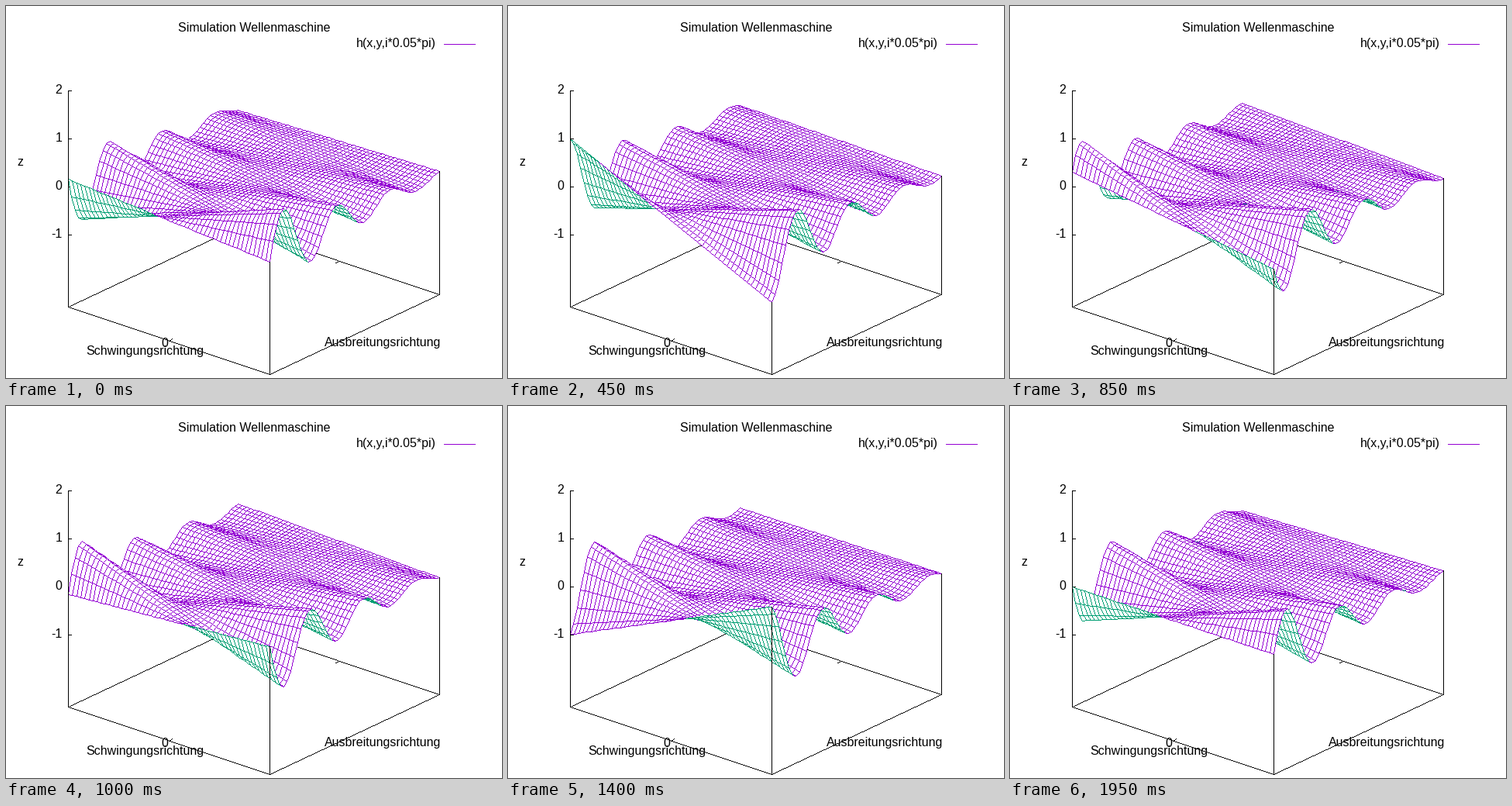
A matplotlib script for the animation above (2000 ms loop, 640 px wide and 480 px high).

```python
import numpy as np
import matplotlib.pyplot as plt
from matplotlib.animation import FuncAnimation

W, H, DPI = 640, 480, 100
FRAMES, INTERVAL = 40, 50
WAVE, DAMP, BASE = 20, 2.5, -2.5
WHITE, BLACK, TOP, UNDER = range(4)
PALETTE = np.array([[255, 255, 255], [0, 0, 0], [148, 0, 211], [0, 158, 115]],
                   dtype=np.uint8)


def project(u, s, z):
    """Map u, s in 0..1 and the height z to stage pixels."""
    return np.array([80 + 260 * u + 219 * s, 233 + 87 * u - 103 * s - 62 * z])


def height(u, s, t):
    return (1 - 2 * u) * np.exp(-DAMP * s) * np.sin(t - WAVE * s)


def snap(v):
    return np.floor(v + 0.5).astype(int)


def trace(p, q, n):
    """Pixels of one-pixel lines from p to q, at most n steps long."""
    d = q - p
    steps = np.maximum(np.abs(d).max(axis=0), 1)[..., None]
    k = np.minimum(np.arange(n + 1), steps) / steps
    return snap(p[..., None] + d[..., None] * k)


def line(canvas, p, q, color=BLACK):
    x, y = trace(snap(np.array(p)), snap(np.array(q)), W)
    canvas[y, x] = color


def cells(a):
    """Corners of every grid cell, ordered from back to front."""
    quads = np.stack([a[:-1, :-1], a[:-1, 1:], a[1:, 1:], a[1:, :-1]], axis=-1)
    return quads[::-1].reshape(-1, 4)


def label(x, y, text, ha="center"):
    ax.text(x - 0.5, y - 0.5, text, ha=ha, va="baseline",
            family="Liberation Sans", fontsize=16 * 72 / DPI, color="black")


# Base, z axis, ticks and key
backdrop = np.full((H, W), WHITE, dtype=np.uint8)
corners = [(0, 0), (1, 0), (1, 1), (0, 1)]
for a, b in zip(corners, corners[1:] + corners[:1]):
    line(backdrop, project(*a, BASE), project(*b, BASE))
for s0, s1 in ((0, 0.02), (1, 0.98)):
    line(backdrop, project(0.5, s0, BASE), project(0.5, s1, BASE))
for z in range(-1, 3):
    line(backdrop, (80, 233 - 62 * z), (84, 233 - 62 * z))
line(backdrop, (565, 49), (605, 49), TOP)

# Sample weights that fill a cell, and the ends of its four sides
a, b = np.meshgrid((np.arange(8) + 0.5) / 8, (np.arange(28) + 0.5) / 28)
FILL = np.stack([(1 - a) * (1 - b), a * (1 - b), a * b, (1 - a) * b])
FILL = FILL.reshape(4, -1)
START, END = [0, 1, 3, 0], [1, 2, 2, 3]
grid = np.linspace(0, 1, 50)
U, S = np.meshgrid(grid, grid)


def render(i):
    t = (i + 1) * 0.05 * np.pi
    canvas = backdrop.copy()
    exact = np.array([cells(v) for v in project(U, S, height(U, S, t))])
    dx, dy = exact[..., 2] - exact[..., 0]
    ex, ey = exact[..., 3] - exact[..., 1]
    color = np.where(dx * ey - ex * dy < 0, TOP, UNDER)

    # Later cells overwrite earlier ones, which hides what lies behind
    quad = snap(exact)
    inside = snap(quad @ FILL)
    sides = trace(quad[..., START], quad[..., END], 30)
    sides = sides.reshape(2, len(color), -1)
    ink = np.hstack([np.full(inside.shape[1:], WHITE),
                     np.repeat(color[:, None], sides.shape[2], axis=1)])
    x, y = np.concatenate([inside, sides], axis=2)
    canvas[y.ravel(), x.ravel()] = ink.ravel()

    for u, s in corners[:3]:
        line(canvas, project(u, s, BASE), project(u, s, height(u, s, t)))
    line(canvas, (80, 109), (80, 388))
    return PALETTE[canvas]


fig = plt.figure(figsize=(W / DPI, H / DPI), dpi=DPI, facecolor="white")
ax = fig.add_axes([0, 0, 1, 1])
ax.axis("off")
picture = ax.imshow(render(0), interpolation="nearest", aspect="auto")

label(320, 33, "Simulation Wellenmaschine")
label(555, 53, "h(x,y,i*0.05*pi)", "right")
label(18, 206, "z")
label(205, 440, "0")
label(179.5, 450, "Schwingungsrichtung")
label(486, 439, "Ausbreitungsrichtung")
for z in range(-1, 3):
    label(72.5, 237 - 62 * z, str(z), "right")


def draw(i):
    picture.set_data(render(i))
    return [picture]


anim = FuncAnimation(fig, draw, frames=FRAMES, interval=INTERVAL,
                     repeat=True, repeat_delay=0, blit=False)
plt.show()
```
